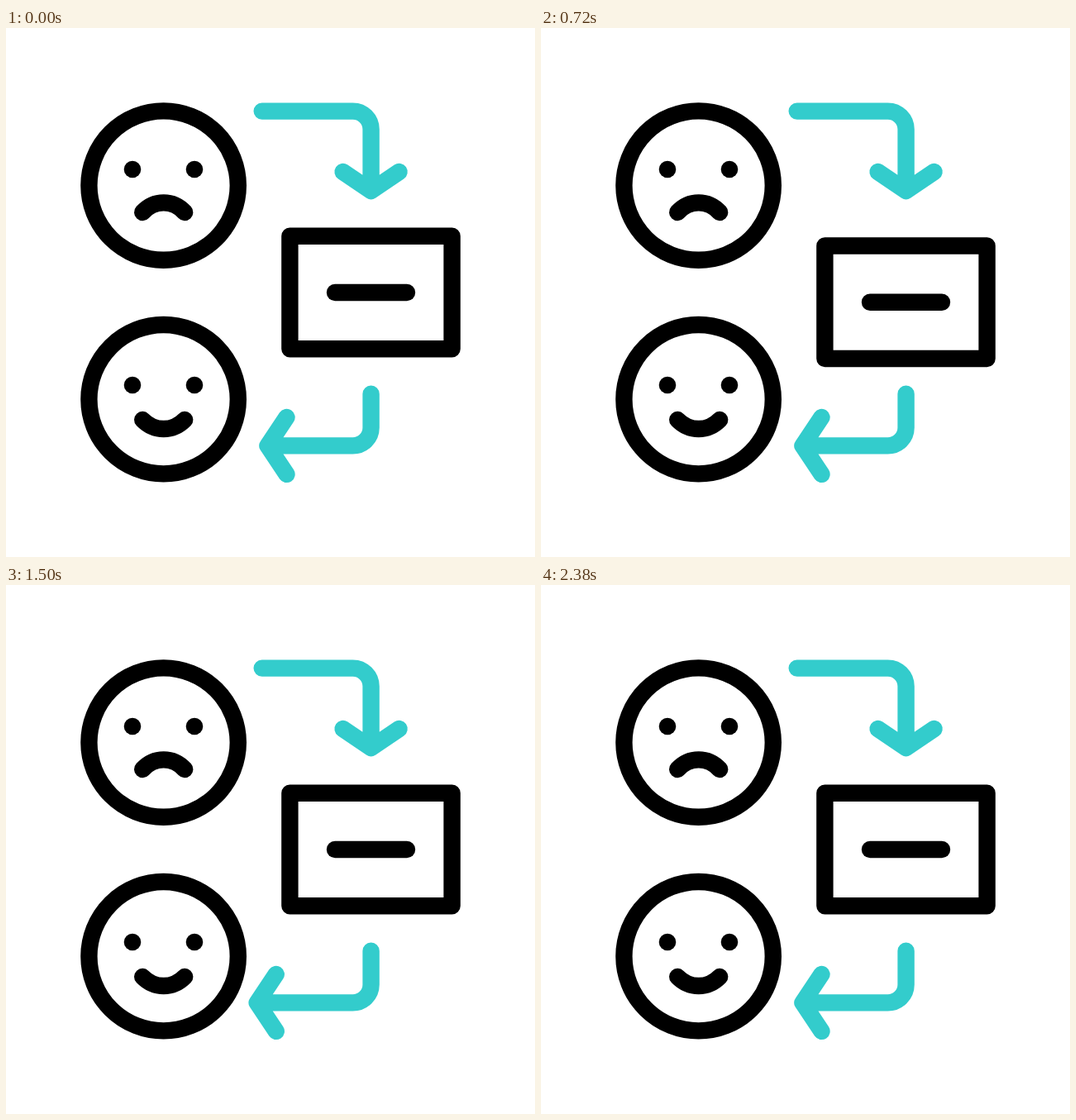
Write an HTML page that moves like this. It is 640 px wide and 640 px high and loops after 2.4 s.

```html
<!DOCTYPE html>
<html lang="en">
<head>
<meta charset="utf-8">
<title>Mood exchange</title>
<style>
  html, body { margin: 0; width: 100%; height: 100%; overflow: hidden; background: #fff; }
  svg { display: block; width: 100vw; height: 100vh; }
  .line { fill: none; stroke: #000; stroke-width: 20.4; stroke-linecap: round; stroke-linejoin: round; }
  .teal { stroke: #33cccc; }
</style>
</head>
<body>
<svg viewBox="0 0 640 640">
  <g id="sad">
    <circle class="line" cx="190.6" cy="190.6" r="90.2"/>
    <g class="eyes"><circle cx="153" cy="171" r="10.3"/><circle cx="228" cy="171" r="10.3"/></g>
    <path class="line mouth"/>
  </g>
  <g id="happy">
    <circle class="line" cx="190.6" cy="449.2" r="90.2"/>
    <path id="ring" class="line teal" style="stroke-width:21.8" pathLength="1"
      d="M100.4 449.2a90.2 90.2 0 1 0 180.4 0a90.2 90.2 0 1 0 -180.4 0"/>
    <g class="eyes"><circle cx="153" cy="432" r="10.3"/><circle cx="228" cy="432" r="10.3"/></g>
    <path class="line mouth"/>
  </g>
  <g id="card" class="line">
    <rect x="343.4" y="251.7" width="196.2" height="136.6"/>
    <path d="M398 320H485"/>
  </g>
  <path id="down" class="line teal"/>
  <path id="back" class="line teal"/>
</svg>
<script>
const LOOP = 2400;
const $ = s => document.querySelector(s);
const ease = p => (1 - Math.cos(Math.PI * p)) / 2;

// Eased value from a list of [time, value] steps.
function at(t, steps) {
  if (t <= steps[0][0]) return steps[0][1];
  for (let i = 1; i < steps.length; i++) {
    const [t0, a] = steps[i - 1], [t1, b] = steps[i];
    if (t < t1) return a + (b - a) * ease((t - t0) / (t1 - t0));
  }
  return steps[steps.length - 1][1];
}
const bump = (t, from, top, to) => at(t, [[from, 0], [top, 1], [to, 0]]);

// k: 0 = at rest, 1 = fully raised with a flat mouth.
function poseFace(id, k, lift, look, mouthY, bend) {
  const face = $(id), y = mouthY - look * k, d = bend * (1 - k), m = y + d, c = y + 0.62 * d;
  face.setAttribute('transform', `translate(0 ${-lift * k})`);
  face.querySelector('.eyes').setAttribute('transform', `translate(0 ${-look * k})`);
  face.querySelector('.mouth').setAttribute('d',
    `M165.2 ${y}C171.8 ${c} 180.8 ${m} 190.7 ${m}S209.6 ${c} 216.2 ${y}`);
}

function drawRing(t) {
  const end = at(t, [[1580, 0], [1975, 1]]);
  const start = at(t, [[2090, 0], [2370, 1]]);
  const ring = $('#ring'), len = end - start;
  ring.style.display = len > 0 ? '' : 'none';
  ring.setAttribute('stroke-dasharray', `${len} 2`);
  ring.setAttribute('stroke-dashoffset', -start);
}

function draw(t) {
  poseFace('#sad', bump(t, 10, 243, 478), 29, 16, 223, -11.6);
  poseFace('#happy', bump(t, 1590, 1830, 2070), 12, 12.6, 474, 11);
  drawRing(t);

  const y = 197 + 34 * bump(t, 144, 384, 624);
  $('#down').setAttribute('d',
    `M309.7 100.6H419.6a22 22 0 0 1 22 22V${y}M407.6 ${y - 23}l34 23l34 -23`);

  const x = 316.5 - 15 * bump(t, 1200, 1440, 1680);
  $('#back').setAttribute('d',
    `M441.6 442.8V483.4a22 22 0 0 1 -22 22H${x}M${x + 23} 470.9l-23 34.5l23 34.5`);

  const dy = at(t, [[520, 0], [700, 12.4], [900, -12], [1120, 0]]);
  const turn = 6.1 * bump(t, 760, 970, 1200);
  $('#card').setAttribute('transform', `translate(0 ${dy}) rotate(${turn} 441.5 320)`);
}

const begin = performance.now();
function tick() {
  draw((performance.now() - begin) % LOOP);
  requestAnimationFrame(tick);
}
draw(0);
requestAnimationFrame(tick);
</script>
</body>
</html>
```
